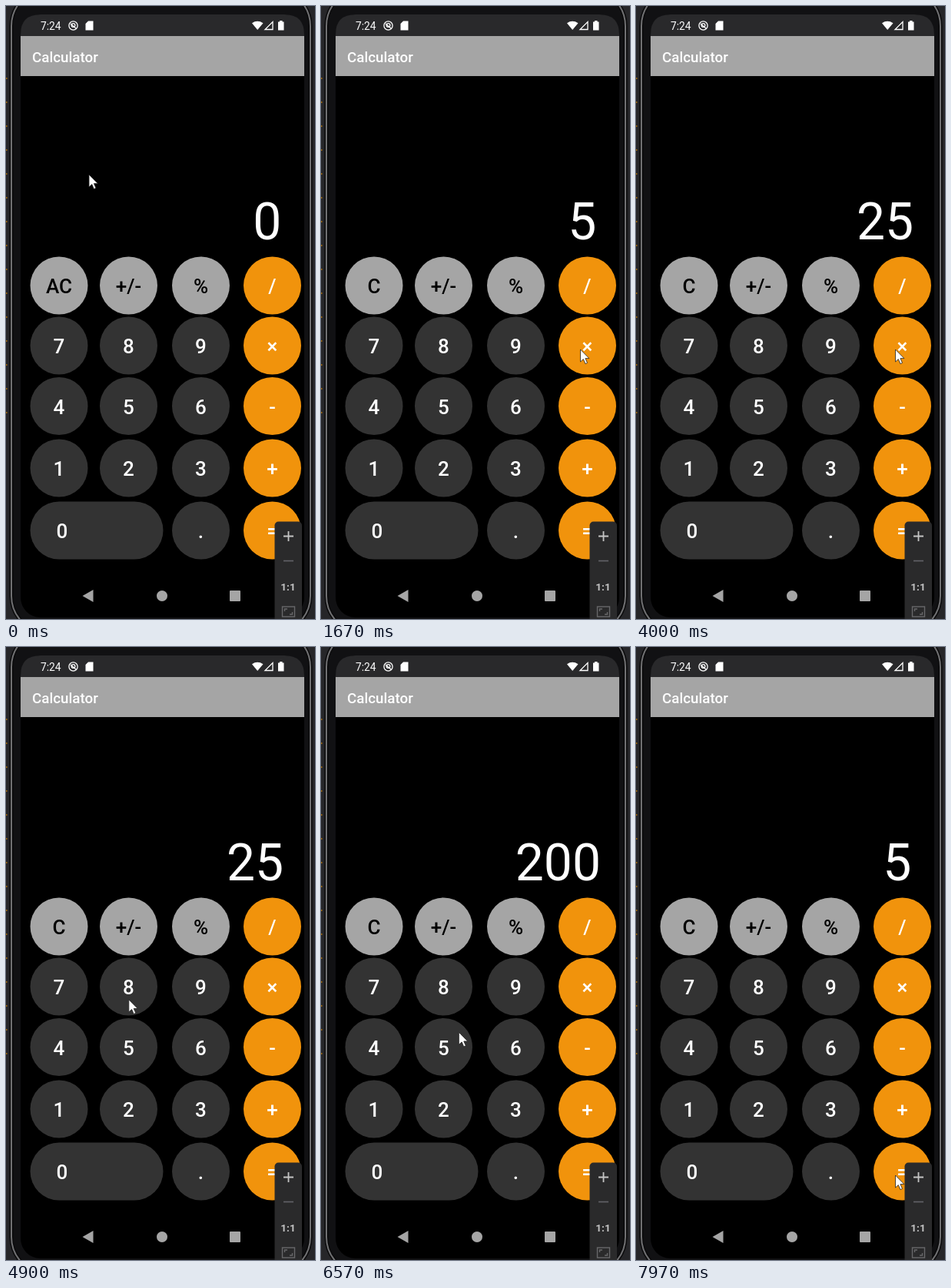
An HTML page for the animation above (8 s loop, 402 by 796 pixels).

```html
<!DOCTYPE html>
<html lang="en">
<head>
<meta charset="utf-8">
<title>Calculator</title>
<style>
  html, body { margin: 0; width: 100%; height: 100%; overflow: hidden; background: #000; }
  svg { display: block; width: 402px; height: 796px; font-family: Roboto, sans-serif; }
  .key { font-size: 26px; font-weight: 500; text-anchor: middle; }
  .light { fill: #a5a5a5; }
  .dark { fill: #333; }
  .orange { fill: #f1930c; }
  .ink { fill: #fff; }
  .line { fill: none; stroke: #fff; stroke-width: 1.3; }
</style>
</head>
<body>
<svg viewBox="0 0 402 796">
  <rect width="402" height="796" fill="#262629"/>
  <g id="ticks" fill="#94620f"></g>

  <!-- phone body -->
  <rect x="7" y="-22" width="389" height="836" rx="48" fill="#111113" stroke="#0a0a0b" stroke-width="5"/>
  <rect x="7" y="-22" width="389" height="836" rx="48" fill="none" stroke="#707072" stroke-width="2"/>
  <rect x="19" y="11" width="369" height="783" rx="26"/>
  <path d="M19 39V37Q19 11 45 11H362Q388 11 388 37V39Z" fill="#29292b"/>

  <!-- status bar -->
  <g class="ink">
    <text x="45" y="30.5" font-size="13.8">7:24</text>
    <circle class="line" cx="87.5" cy="25.5" r="5.6"/>
    <circle class="line" cx="87.5" cy="25" r="2.4"/>
    <path class="line" d="M84 23L91 29"/>
    <path d="M107 19.5H113.5V31.5H103.5V23Z"/>
    <path d="M320 22.2Q327 17.5 334.5 22.2L327.2 31Z"/>
    <path class="line" d="M337 30.5H347V20.5Z"/>
    <path d="M354 20.5H356V19H359.5V20.5H361.5V31.5H354Z"/>
  </g>

  <rect class="light" x="19" y="39" width="369" height="52"/>
  <text class="ink" x="34" y="73" font-size="18.8" font-weight="500">Calculator</text>

  <text id="display" class="ink" y="303" font-size="66" text-anchor="middle"></text>
  <g id="keys"></g>

  <!-- navigation bar -->
  <g class="light">
    <path d="M99.5 766L113.5 758V774Z"/>
    <circle cx="203" cy="766" r="7"/>
    <rect x="291" y="759" width="14" height="14" rx="1"/>
  </g>

  <!-- zoom panel -->
  <rect x="349.5" y="669.5" width="35.5" height="135" rx="5" fill="#2a2a2b"/>
  <path d="M361 688.5H374M367.5 682V695" stroke="#c4c4c4" stroke-width="1.8"/>
  <path d="M361 720.5H374" stroke="#626268" stroke-width="1.6"/>
  <text x="367" y="759" font-size="13.5" font-weight="700" text-anchor="middle" fill="#c4c4c4">1:1</text>
  <g fill="none" stroke="#68686a" stroke-width="1.4">
    <rect x="359.5" y="780" width="16" height="13"/>
    <path d="M362.5 786V783H366M372.5 787V790H369"/>
  </g>

  <path id="cursor" d="M0 0V16L3.8 12.6L6.4 18.6L9 17.4L6.4 11.6H11.4Z"
        fill="#fff" stroke="#222" stroke-width=".8"/>
</svg>
<script>
  const LOOP = 8000, TRAVEL = 600, PRESS_DELAY = 130;
  const $ = id => document.getElementById(id);

  function add(parent, tag, attrs, text = '') {
    const el = document.createElementNS('http://www.w3.org/2000/svg', tag);
    for (const name in attrs) el.setAttribute(name, attrs[name]);
    el.textContent = text;
    return parent.appendChild(el);
  }

  for (let y = 93; y < 530; y += 31)
    add($('ticks'), 'rect', { x: 0, y, width: 1.6, height: 2 });

  // Keypad: '0' spans two columns.
  const columns = [69, 159.5, 253.5, 346.5];
  const rowY = [363, 441, 519.5, 600, 681];
  const rows = [['AC', '+/-', '%', '/'], [...'789×'], [...'456-'], [...'123+'], ['0', '', '.', '=']];
  const keys = {};

  rows.forEach((row, r) => row.forEach((label, c) => {
    if (!label) return;
    const x = columns[c], y = rowY[r];
    const width = label === '0' ? 173 : 75;
    const kind = c === 3 ? 'orange' : r === 0 ? 'light' : 'dark';
    add($('keys'), 'rect', { x: x - 37.5, y: y - 37.5, width, height: 75, rx: 37.5, class: kind });
    const text = add($('keys'), 'text', {
      x: label === '0' ? x + 4 : x, y: y + 10, class: kind === 'light' ? 'key' : 'key ink'
    }, label);
    keys[label] = { x, y, text };
  }));

  // The pointer visits these keys; each time is its arrival.
  const visits = [
    ['5', 930], ['×', 1600], ['5', 2330], ['=', 3060], ['×', 3850],
    ['8', 4800], ['=', 5420], ['/', 6080], ['5', 6720], ['=', 7900]
  ];

  function displayAt(time) {
    let shown = 0, stored = 0, operator = '';
    for (const [key, arrival] of visits) {
      if (time < arrival + PRESS_DELAY) break;
      if (key === '=') shown = operator === '×' ? stored * shown : stored / shown;
      else if (key === '×' || key === '/') [stored, operator] = [shown, key];
      else shown = Number(key);
    }
    return String(shown);
  }

  const ease = u => u * u * (3 - 2 * u);

  function pointerAt(time) {
    let x = 108, y = 219;
    for (const [key, arrival] of visits) {
      const u = Math.min(1, Math.max(0, (time - arrival + TRAVEL) / TRAVEL));
      x += (keys[key].x - 9 - x) * ease(u);
      y += (keys[key].y + 5 - y) * ease(u);
    }
    return `${x} ${y}`;
  }

  const start = performance.now();

  function draw() {
    const time = (performance.now() - start) % LOOP;
    const value = displayAt(time);
    $('display').textContent = value;
    $('display').setAttribute('x', 355.5 - 15.7 * value.length);
    keys.AC.text.textContent = value === '0' ? 'AC' : 'C';
    $('cursor').setAttribute('transform', `translate(${pointerAt(time)})`);
    requestAnimationFrame(draw);
  }
  draw();
</script>
</body>
</html>
```
